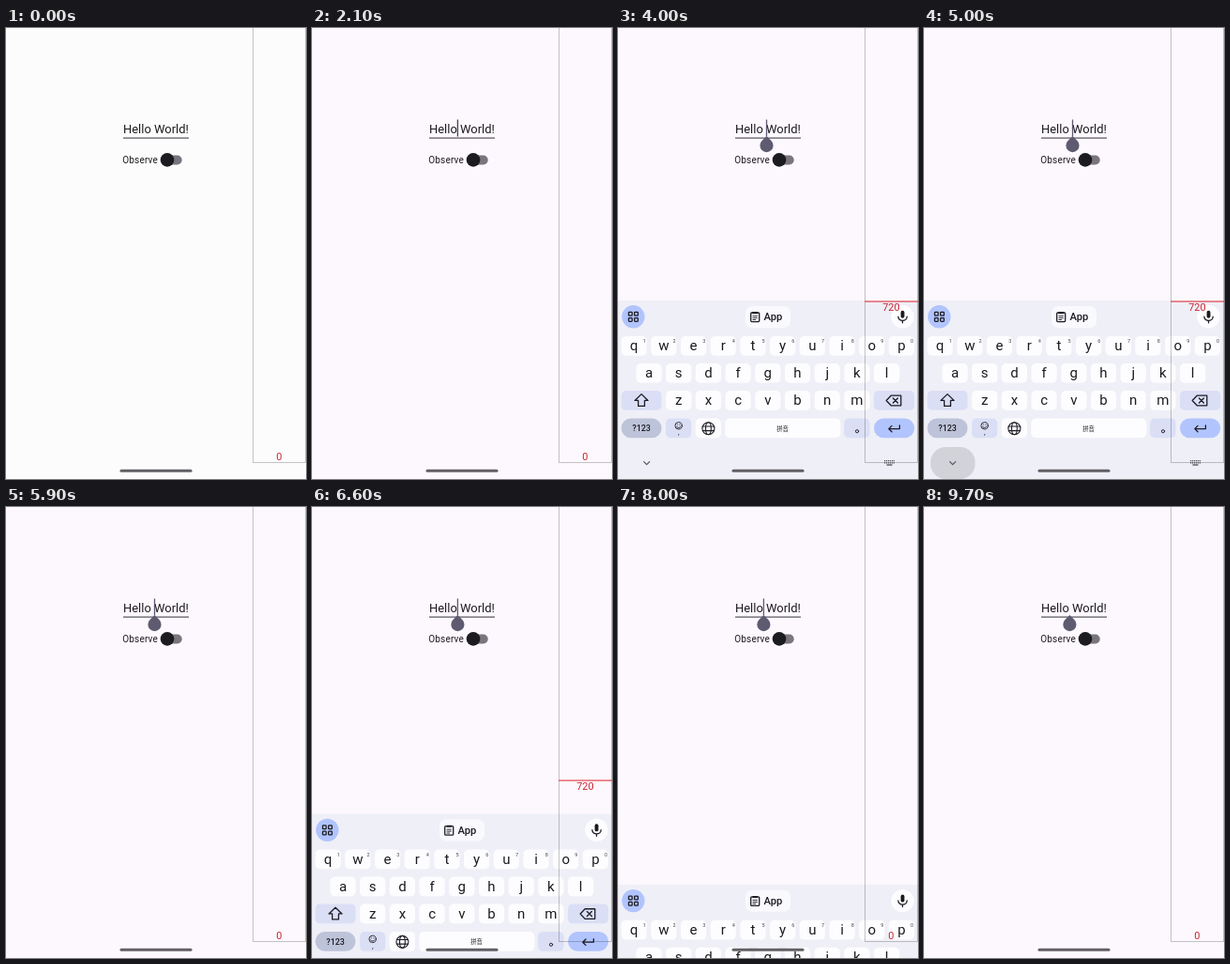
An HTML page for the animation above (9900 ms loop, 320 px wide and 480 px high).

```html
<!DOCTYPE html>
<html lang="en">
<head>
<meta charset="utf-8">
<title>Keyboard inset demo</title>
<style>
  html, body { margin: 0; width: 100%; height: 100%; overflow: hidden; background: #fdf8fd; }
  svg { display: block; width: 320px; height: 480px; font-family: Roboto, sans-serif; fill: #1c1b1f; }
  .mid { text-anchor: middle; }
  .line { fill: none; stroke: #1c1c24; stroke-width: 1.3; stroke-linecap: round; stroke-linejoin: round; }
  .key { fill: #fdfdff; }
  .soft { fill: #dadff5; }
  .blue { fill: #b1c4fd; }
  .letter { font-size: 15px; text-anchor: middle; }
  .hint { font-size: 5.5px; text-anchor: middle; fill: #45464f; }
</style>
</head>
<body>
<svg viewBox="0 0 320 480">
  <rect id="page" width="320" height="480"/>

  <text x="125" y="111.6" font-size="12.94">Hello World!</text>
  <rect x="125" y="116.5" width="70" height="1.2" fill="#56525b"/>
  <rect id="caret" y="97.5" width="1.3" height="18"/>
  <path id="handle" d="M0 115 L5 120 A7.1 7.1 0 1 1 -5 120 Z" fill="#5e5b71"/>
  <text x="124.2" y="144" font-size="10" letter-spacing=".2">Observe</text>
  <rect x="165.5" y="135.5" width="22.2" height="10" rx="5" fill="#79757d"/>
  <circle cx="172" cy="140.4" r="7.3"/>

  <g id="board">
    <rect y="290" width="320" height="195" fill="#efeff7"/>
    <rect id="press" x="7" y="446" width="47.5" height="34" rx="16" fill="#d2d2d9"/>

    <circle class="blue" cx="16.3" cy="307.3" r="12.2"/>
    <g class="line" stroke-width="1.2">
      <rect x="11.4" y="302.4" width="3.7" height="3.7" rx=".7"/>
      <rect x="17.6" y="302.4" width="3.7" height="3.7" rx=".7"/>
      <rect x="11.4" y="308.6" width="3.7" height="3.7" rx=".7"/>
      <rect x="17.6" y="308.6" width="3.7" height="3.7" rx=".7"/>
    </g>

    <rect x="136" y="296" width="48" height="23" rx="7" fill="#f9f9fe"/>
    <g class="line">
      <rect x="141.7" y="303" width="9" height="9.6" rx="1"/>
      <path d="M144 306.6h4.4M144 308.6h4.4M144 310.5h2.6" stroke-width=".9"/>
      <path d="M144.3 303.2h3.8" stroke-width="2.2"/>
    </g>
    <text x="155.5" y="311.4" font-size="11.2" font-weight="500">App</text>

    <circle class="key" cx="303.5" cy="307.3" r="12.2"/>
    <rect x="301.6" y="300.8" width="3.9" height="8" rx="1.95"/>
    <path class="line" d="M298.9 307.2a4.65 4.2 0 0 0 9.3 0M303.5 311.6v2.2"/>

    <g id="keys"></g>

    <path class="line" d="M25 389.6l7 6.8h-3.6v6h-6.8v-6h-3.6z"/>
    <path class="line" d="M291.2 391.2h10.6v10.6h-10.6l-5-5.3zM293.4 394l5 5M298.4 394l-5 5"/>

    <text class="mid" x="25" y="429.4" font-size="8.8" font-weight="500">?123</text>
    <g class="line" style="stroke-width:.9">
      <circle cx="64.6" cy="423.3" r="3.7"/>
      <path d="M62.7 424.4a2 1.6 0 0 0 3.8 0M63.3 422.1v.2M65.9 422.1v.2"/>
      <circle cx="255" cy="429.2" r="1.6"/>
    </g>
    <text class="mid" x="64.8" y="433" font-size="8">,</text>
    <g class="line" style="stroke-width:1.1">
      <circle cx="96.4" cy="426.3" r="6.5"/>
      <ellipse cx="96.4" cy="426.3" rx="2.9" ry="6.5"/>
      <path d="M90.4 424h12M90.4 428.6h12"/>
    </g>
    <text class="mid" x="175.6" y="428.8" font-size="6.3" font-family="'Noto Sans CJK SC','Noto Sans CJK',sans-serif">拼音</text>
    <path class="line" d="M300.4 423v3.6h-11.6M292 423.4l-3.2 3.2 3.2 3.2"/>

    <path class="line" style="stroke:#55565e" d="M27.6 461.6l3 3 3-3"/>
    <g class="line" style="stroke:#4c4d55;stroke-linecap:butt">
      <path d="M284 460.6h11M284 462.8h11" stroke-dasharray="1.2 .75"/>
      <path d="M286.5 465h6"/>
    </g>
  </g>

  <rect x="121.5" y="469.8" width="77" height="3" rx="1.5" fill="#625f65"/>
  <rect x="263.5" y="-5" width="56" height="467.5" fill="none" stroke="#1c1b1f" stroke-opacity=".25"/>
  <rect id="mark" x="263" y="290.5" width="57" height="1.1" fill="#e0343c"/>
  <text id="value" class="mid" x="291.4" font-size="10.9" fill="#cb2430"></text>
</svg>
<script>
const LOOP = 9900, TRAVEL = 192;
const $ = id => document.getElementById(id);

// Keyboard keys
const PITCH = 31.7, parts = [];
const key = (x, y, w, cls, r = 5) =>
  parts.push(`<rect x="${x}" y="${y}" width="${w}" height="20.8" rx="${r}" class="${cls}"/>`);
[['qwertyuiop', 17.1, 328], ['asdfghjkl', 33, 357], ['zxcvbnm', 64.7, 386]].forEach(([row, x0, y], n) => {
  [...row].forEach((ch, i) => {
    const x = x0 + i * PITCH;
    key(x - 13.6, y, 27.2, 'key');
    parts.push(`<text class="letter" x="${x}" y="${y + 15}">${ch}</text>`);
    if (!n) parts.push(`<text class="hint" x="${x + 11.2}" y="${y + 7}">${(i + 1) % 10}</text>`);
  });
});
key(3.5, 386, 43, 'soft');
key(273, 386, 43.2, 'soft');
key(3.5, 415.5, 43, 'num', 10.4);
key(51, 415.5, 27.2, 'soft');
key(82.7, 415.5, 27.2, 'key');
key(114.3, 415.5, 123, 'key');
key(241.2, 415.5, 27.2, 'soft');
key(273, 415.5, 43.2, 'blue', 10.4);
$('keys').innerHTML = parts.join('');
document.querySelector('.num').setAttribute('fill', '#bdc3d9');

// Each visit: keyboard opens, its close button is pressed, it leaves
const VISITS = [
  { open: 2800, press: 4800, close: 5100, end: 5500, x: 158.5 },
  { open: 6400, press: 7600, close: 7900, end: 8300, x: 155.4 }
];
const clamp = v => Math.max(0, Math.min(1, v));

function shift(t, v) {
  if (!v || t >= v.end) return TRAVEL;
  if (t < v.close) return TRAVEL * Math.exp(-8.25 * (t - v.open) / 1000);
  const p = (t - v.close) / (v.end - v.close);
  return TRAVEL * (1 - (1 - p) ** 3);
}

function caretOn(t) {
  if (t < 800) return false;
  if (t < 2800) return Math.floor((t - 800) / 500) % 2 === 0;
  return t < 8200;
}

function draw(t) {
  const v = VISITS.filter(s => t >= s.open).pop();
  const x = v ? v.x : 155.4;
  const up = v && t < v.close;
  const tint = clamp(t / 700);
  $('page').setAttribute('fill', `rgb(${252 + tint},${252 - 4 * tint},${252 + tint})`);

  const dy = shift(t, v);
  $('board').setAttribute('transform', `translate(0 ${dy})`);
  $('board').style.display = dy < TRAVEL ? '' : 'none';
  $('press').style.opacity = v ? clamp((t - v.press + 60) / 150) : 0;

  $('handle').style.display = v ? '' : 'none';
  $('handle').setAttribute('transform', `translate(${x} 0)`);
  $('caret').style.display = caretOn(t) ? '' : 'none';
  $('caret').setAttribute('x', x - 0.65);
  $('caret').setAttribute('fill', v ? '#5e5b71' : '#46434f');

  $('mark').style.display = up ? '' : 'none';
  $('value').textContent = up ? '720' : '0';
  $('value').setAttribute('y', up ? 300.6 : 460.4);
}

const start = performance.now();
function tick() {
  draw((performance.now() - start) % LOOP);
  requestAnimationFrame(tick);
}
tick();
</script>
</body>
</html>
```
